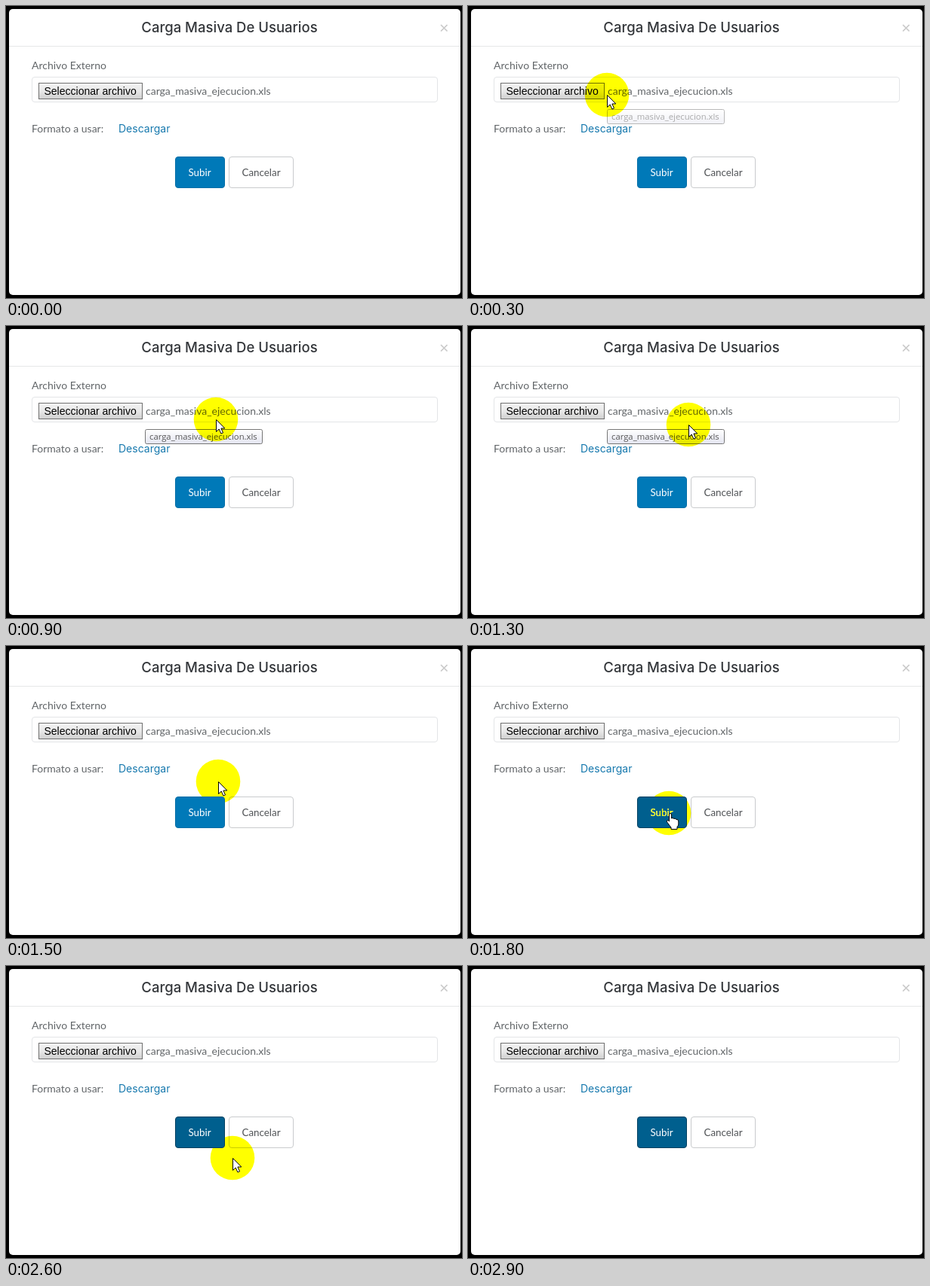
An HTML page that plays this animation: 604 px wide and 388 px high, repeating every 4000 ms.

```html
<!DOCTYPE html>
<html lang="es">
<head>
<meta charset="utf-8">
<title>Carga masiva</title>
<style>
  html, body { margin: 0; width: 100%; height: 100%; overflow: hidden; background: #000; }
  svg { display: block; width: 604px; height: 388px; isolation: isolate; }
  text { font: 14px Lato, sans-serif; fill: #626669; }
  .title { font: 500 18.5px Inter, sans-serif; fill: #34373b; }
  .link { font: 14px Inter, sans-serif; fill: #1779ae; }
  .native { font: 14px "Liberation Sans", Arial, sans-serif; fill: #000; }
  .tip { font: 11.3px "Open Sans", sans-serif; fill: #575757; }
  .btn { font-size: 13.4px; text-anchor: middle; }
  #halo { fill: #ff0; mix-blend-mode: multiply; }
</style>
</head>
<body>
<svg viewBox="0 0 604 388">
  <defs>
    <linearGradient id="gray" x2="0" y2="1">
      <stop stop-color="#f3f3f3"/><stop offset=".5" stop-color="#e8e8e8"/><stop offset="1" stop-color="#cfcfcf"/>
    </linearGradient>
    <linearGradient id="pale" x2="0" y2="1">
      <stop stop-color="#fff"/><stop offset="1" stop-color="#e4e5f0"/>
    </linearGradient>
    <clipPath id="spot"><circle id="spotShape" r="29.3"/></clipPath>
  </defs>

  <rect width="604" height="388"/>
  <rect x="4" y="4" width="598" height="380" rx="5" fill="#fff"/>
  <path d="M4 53.5H602" stroke="#e6e7e8"/>
  <text class="title" x="296" y="35" text-anchor="middle">Carga Masiva De Usuarios</text>
  <path d="M576 25l8.5 8.5M584.5 25l-8.5 8.5" stroke="#c9c9c9" stroke-width="1.7"/>

  <text x="34" y="84">Archivo Externo</text>
  <rect x="34.5" y="94.5" width="537" height="33" rx="3.5" fill="#fff" stroke="#e3e5e7"/>
  <rect x="43.5" y="102.5" width="137" height="21" fill="url(#gray)" stroke="#707070"/>
  <text class="native" x="50.5" y="118">Seleccionar archivo</text>
  <text x="185" y="118">carga_masiva_ejecucion.xls</text>
  <text x="34" y="168">Formato a usar:</text>
  <text class="link" x="149" y="168">Descargar</text>

  <rect x="295.5" y="200.5" width="85" height="41" rx="3.5" fill="#fff" stroke="#c9cbcd"/>
  <text class="btn" x="338" y="226" style="fill:#505356">Cancelar</text>

  <g id="tooltip">
    <rect x="184.5" y="137.5" width="155" height="19" rx="2" fill="url(#pale)" stroke="#767676"/>
    <text class="tip" x="190" y="151">carga_masiva_ejecucion.xls</text>
  </g>

  <circle id="halo" r="29.3"/>
  <rect id="upload" x="224.5" y="200.5" width="65" height="41" rx="3.5"/>
  <text class="btn" x="256.5" y="226" style="fill:#fff">Subir</text>
  <g id="glow" clip-path="url(#spot)">
    <text class="btn" x="256.5" y="226" style="fill:#ff0">Subir</text>
  </g>
  <circle id="click" cx="266" cy="222" r="7" fill="#e3120b"/>

  <g id="pointer" stroke="#000" stroke-linejoin="round">
    <path id="arrow" fill="#fff" d="M.5.5V16.5L4.2 13L6.9 19L9.5 17.9L6.9 12H11.8Z"/>
    <path id="hand" fill="#fff" d="M.5 2Q.5.5 2 .5T3.6 2V7Q5 5.8 6.6 7.4Q8.3 6.6 9.7 8.3Q12.6 7.9 12.8 11V15Q12.6 17 11 18.5V21.5H3V19Q.8 16.5-1.2 13.6Q-3.7 11-2.2 9.8Q-.9 9 .5 11Z"/>
  </g>
</svg>
<script>
const LOOP = 4000, STEP = 100;
const START = 100, END = 2900, PRESS = 2400;
const IDLE = '#0079b8', HOVER = '#005f8e', DOWN = '#004d71';

// time, x, y of the pointer tip
const path = [
  [100, 171, 139], [200, 182, 121], [300, 184, 118], [400, 180, 109],
  [500, 174, 112], [600, 173, 115], [700, 218, 120], [900, 278, 124],
  [1100, 310, 125], [1200, 310, 125], [1300, 292, 131], [1500, 281, 180],
  [1700, 267, 227], [1800, 266, 222], [2400, 266, 222], [2500, 270, 226],
  [2600, 300, 255], [2800, 381, 333]
];
const $ = id => document.getElementById(id);
const clamp = v => Math.max(0, Math.min(1, v));
const show = (id, on) => $(id).setAttribute('visibility', on ? 'inherit' : 'hidden');

function tipAt(t) {
  let i = 1;
  while (i < path.length - 1 && path[i][0] < t) i++;
  const [t0, x0, y0] = path[i - 1], [t1, x1, y1] = path[i];
  const k = clamp((t - t0) / (t1 - t0));
  return [x0 + (x1 - x0) * k, y0 + (y1 - y0) * k];
}

function draw(t) {
  const [x, y] = tipAt(t);
  const active = t >= START && t < END;
  const over = active && x > 224 && x < 290 && y > 200 && y < 242;
  const pressed = t >= PRESS && t < PRESS + STEP;
  const color = pressed ? DOWN : over || t >= PRESS ? HOVER : IDLE;

  for (const id of ['halo', 'spotShape']) {
    $(id).setAttribute('cx', x);
    $(id).setAttribute('cy', y);
  }
  $('pointer').setAttribute('transform', `translate(${x} ${y})`);
  for (const id of ['halo', 'glow', 'pointer']) show(id, active);
  show('arrow', !over);
  show('hand', over);
  show('click', pressed);

  $('upload').setAttribute('fill', color);
  $('upload').setAttribute('stroke', color === IDLE ? '#006da6' : '#003f60');
  $('tooltip').setAttribute('opacity', t < 1000 ? clamp((t - 200) / 200) : clamp((1500 - t) / 200));
}

function frame() {
  const t = performance.now() % LOOP;
  draw(Math.floor(t / STEP) * STEP);
  requestAnimationFrame(frame);
}
frame();
</script>
</body>
</html>
```
